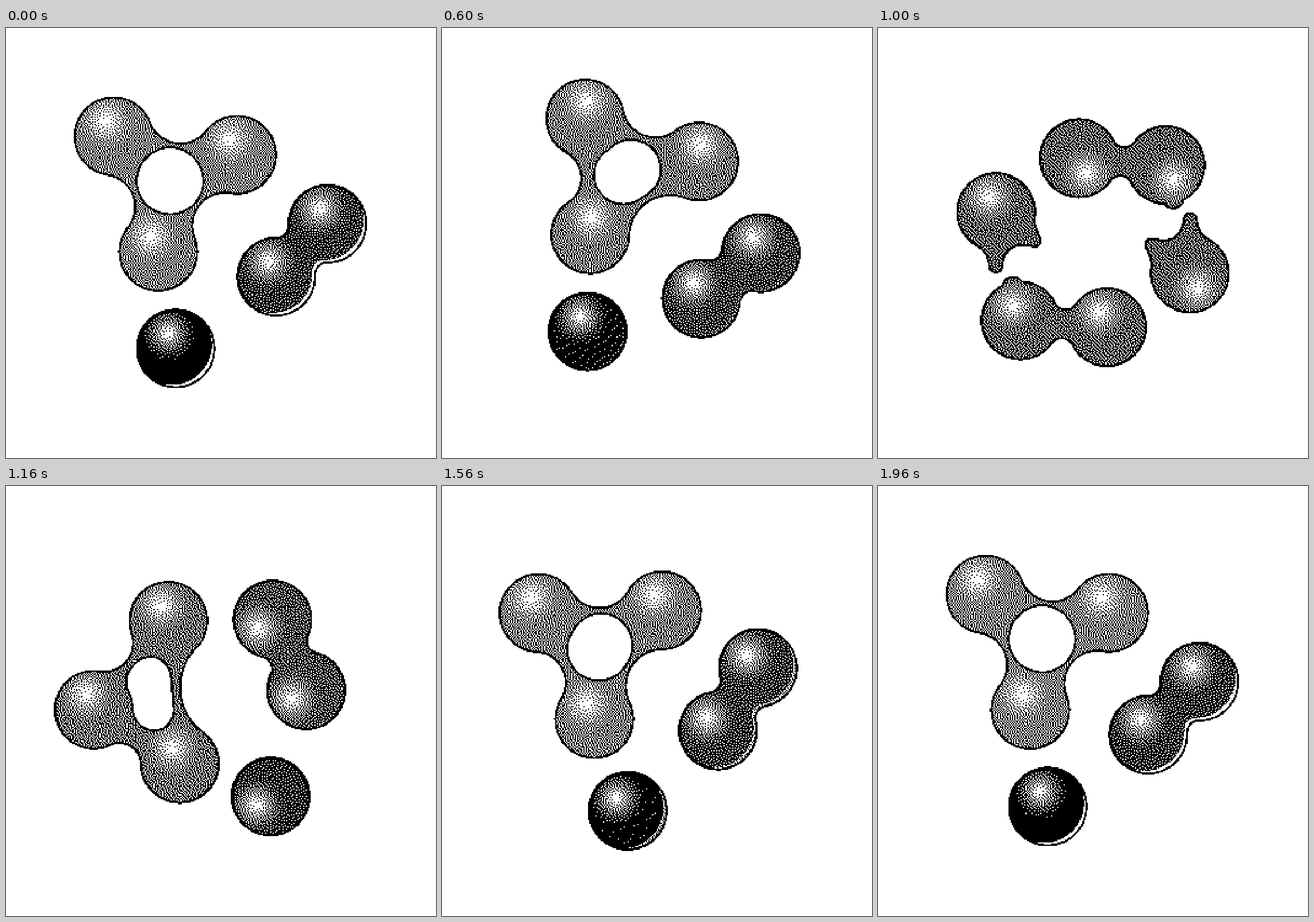
Write an HTML page with a canvas that moves like this. It is 748x748 px and loops after 2 s.

```html
<!DOCTYPE html>
<html lang="en">
<head>
<meta charset="utf-8">
<title>Blobs</title>
<style>
  html, body { margin: 0; width: 100%; height: 100%; overflow: hidden; background: #fff; }
  canvas { display: block; width: 748px; height: 748px; image-rendering: pixelated; }
</style>
</head>
<body>
<canvas id="stage" width="350" height="350"></canvas>
<script>
const LOOP = 2000, STEP = 40, N = 350, SCALE = 748 / N;
const CX = 374, CY = 373.5, RADIUS = 69.5, LINE = 3.8, NECK = 19, BAR = 5;
const BUMP = 20, TIP = 13;

// Rest places around the centre: three of the trio, two of the pair, one single.
const REST = [[-187, -185], [28, -153], [-109, 16], [185, -33], [96, 59], [-79, 184]];
const TONE = [.48, .48, .48, .2, .2, 0];
const NEXT = [4, 5, 3, 2, 0, 1];

const ctx = document.getElementById('stage').getContext('2d');
const image = ctx.createImageData(N, N);
const pixels = new Uint32Array(image.data.buffer);
const mix = (a, b, k) => a + (b - a) * k;
const clamp = v => Math.max(0, Math.min(1, v));
const gap = (a, b) => Math.hypot(a.x - b.x, a.y - b.y);

function turn(x, y, angle) {
  const c = Math.cos(angle), s = Math.sin(angle);
  return [x * c - y * s, x * s + y * c];
}

// Repeatable grain between -.5 and .5.
function grain(i, j) {
  const v = Math.sin(i * 12.9898 + j * 78.233) * 43758.5453;
  return v - Math.floor(v) - .5;
}

// Bezier ease with a flat start and end.
function ease(t) {
  const h = t < .5 ? .75 : .71;
  let lo = 0, hi = 1;
  for (let i = 0; i < 30; i++) {
    const u = (lo + hi) / 2, v = 1 - u;
    if (3 * h * u * v * v + 3 * (1 - h) * u * u * v + u * u * u < t) lo = u; else hi = u;
  }
  return lo * lo * (3 - 2 * lo);
}

// Side of a neck with a given fillet radius; long necks get a straight middle.
function filletSide(half, rho) {
  const reach = RADIUS + rho;
  const c = Math.min(half, Math.sqrt(reach ** 2 - (BAR + rho) ** 2));
  return { rho, c, w: Math.sqrt(reach ** 2 - c * c) - rho };
}

// Side of a neck made of one arc that leaves a given half width.
function arcSide(half, w) {
  return { rho: (half ** 2 + w ** 2 - RADIUS ** 2) / (2 * (RADIUS - w)), c: half, w };
}

// Neck between two balls; the outer side faces away from the third ball.
function link(a, b, third, rho, outerWidth) {
  const dx = b.x - a.x, dy = b.y - a.y, len = Math.hypot(dx, dy);
  const ux = dx / len, uy = dy / len;
  const inner = filletSide(len / 2, rho);
  const outer = outerWidth ? arcSide(len / 2, outerWidth) : inner;
  const side = Math.sign((third.y - a.y) * ux - (third.x - a.x) * uy);
  return { x: a.x, y: a.y, ux, uy, len, inner, outer, side, tip: 0 };
}

// Torn end of a neck, pointing away from a ball.
function stub(a, angle, tip) {
  const rho = 40, c = Math.sqrt((RADIUS + rho) ** 2 - (TIP + rho) ** 2);
  const inner = { rho, c, w: TIP };
  return { x: a.x, y: a.y, ux: Math.cos(angle), uy: Math.sin(angle), len: 1e3, inner, outer: inner, side: 1, tip };
}

function linkDistance(l, x, y) {
  const px = x - l.x, py = y - l.y;
  let u = px * l.ux + py * l.uy;
  if (u < 0 || u > l.len) return 1e3;
  const across = py * l.ux - px * l.uy, v = Math.abs(across);
  if (l.tip) {
    if (u > l.tip) return Math.hypot(u - l.tip, v) - TIP;
  } else {
    u = Math.min(u, l.len - u);
  }
  const s = across * l.side > 0 ? l.inner : l.outer, h = s.w + s.rho;
  if (v * s.c > u * h) return 1e3;
  return u < s.c ? s.rho - Math.hypot(u - s.c, v - h) : v - s.w;
}

function distance(group, x, y) {
  let d = 1e3;
  for (const b of group.balls) d = Math.min(d, Math.hypot(x - b.x, y - b.y) - RADIUS);
  for (const b of group.bumps) d = Math.min(d, Math.hypot(x - b.x, y - b.y) - BUMP);
  for (const l of group.links) d = Math.min(d, linkDistance(l, x, y));
  return d;
}

// k is 0 when the three balls are one trio and 1 when they are pair and single.
function makeGroup(balls, p, q, single, k, spin) {
  const rho = NECK + 72 * Math.max(0, .5 - k);
  const links = [link(p, q, single, rho)], bumps = [];
  if (k < .45) {
    const width = 6 + 6.5 * clamp(8 * k);
    links.push(link(p, single, q, rho, width), link(q, single, p, rho, width));
  } else if (k < .55) {
    const aim = Math.atan2((p.y + q.y) / 2 - single.y, (p.x + q.x) / 2 - single.x) + .08;
    links.push(stub(single, aim + .47, 94), stub(single, aim - .47, 83));
    const near = gap(p, single) < gap(q, single) ? p : q;
    const f = 59 / gap(near, single);
    bumps.push({ x: mix(near.x, single.x, f), y: mix(near.y, single.y, f) });
  }
  return {
    balls, links, bumps,
    glow: turn(-13, -26, spin),
    rim: turn(6.3, 6.3, spin),
    rimPower: clamp(1 - (1 - k) / .1)
  };
}

function scene(t) {
  const e = ease(t);
  const balls = REST.map(([x, y], i) => {
    const n = NEXT[i], [ex, ey] = REST[n];
    // The far trio ball and the near pair ball swap places on a bent path.
    const bend = i === 0 ? 62 * e * e * (1 - e) : i === 4 ? -62 * e * (1 - e) ** 2 : 0;
    const [px, py] = turn(mix(x, -ex, e) + .81 * bend, mix(y, -ey, e) - .585 * bend, Math.PI * e);
    const lift = i === 1 || i === 5 ? .1 * (4 * e * (1 - e)) ** 3 : 0;
    return { x: CX + px, y: CY + py, tone: mix(TONE[i], TONE[n], e) + lift };
  });
  const [a, b, c, d, f, g] = balls;
  return [
    makeGroup([a, b, c], a, c, b, e, 2 * Math.PI * e),
    makeGroup([d, f, g], d, f, g, 1 - e, 0)
  ];
}

function shade(group, x, y) {
  let best = 1e9, tone = 0, glow = 0;
  for (const b of group.balls) {
    const r = Math.hypot(x - b.x, y - b.y);
    if (r < best) { best = r; tone = b.tone; }
    const h = Math.hypot(x - b.x - group.glow[0], y - b.y - group.glow[1]);
    glow = Math.max(glow, clamp(1.05 - h / 48));
  }
  let light = mix(tone, 1, Math.min(1, glow ** 1.5));
  if (group.rimPower > 0 && distance(group, x + group.rim[0], y + group.rim[1]) > 0)
    light = mix(light, 1, group.rimPower);
  return light;
}

// One-bit picture, spreading each rounding error to the next pixels.
function draw(t) {
  const groups = scene(t);
  const carry = new Float32Array(N * (N + 2));
  for (let j = 0; j < N; j++) {
    for (let i = 0; i < N; i++) {
      const x = (i + .5) * SCALE, y = (j + .5) * SCALE, at = j * N + i;
      let group = groups[0], d = distance(group, x, y);
      if (d > 0) {
        group = groups[1];
        d = distance(group, x, y);
      }
      let on = d > 0;
      if (d < -LINE) {
        const value = shade(group, x, y) + carry[at];
        on = value > .5 + .25 * grain(i, j);
        const err = (value - on) / 16;
        carry[at + 1] += err * 7;
        carry[at + N - 1] += err * 3;
        carry[at + N] += err * 5;
        carry[at + N + 1] += err;
      }
      pixels[at] = on ? 0xffffffff : 0xff000000;
    }
  }
  ctx.putImageData(image, 0, 0);
}

const start = performance.now();
let shown = -1;
function tick() {
  const step = Math.floor(Math.max(0, performance.now() - start) % LOOP / STEP);
  if (step !== shown) {
    shown = step;
    draw(step * STEP / LOOP);
  }
  requestAnimationFrame(tick);
}
tick();
</script>
</body>
</html>
```
